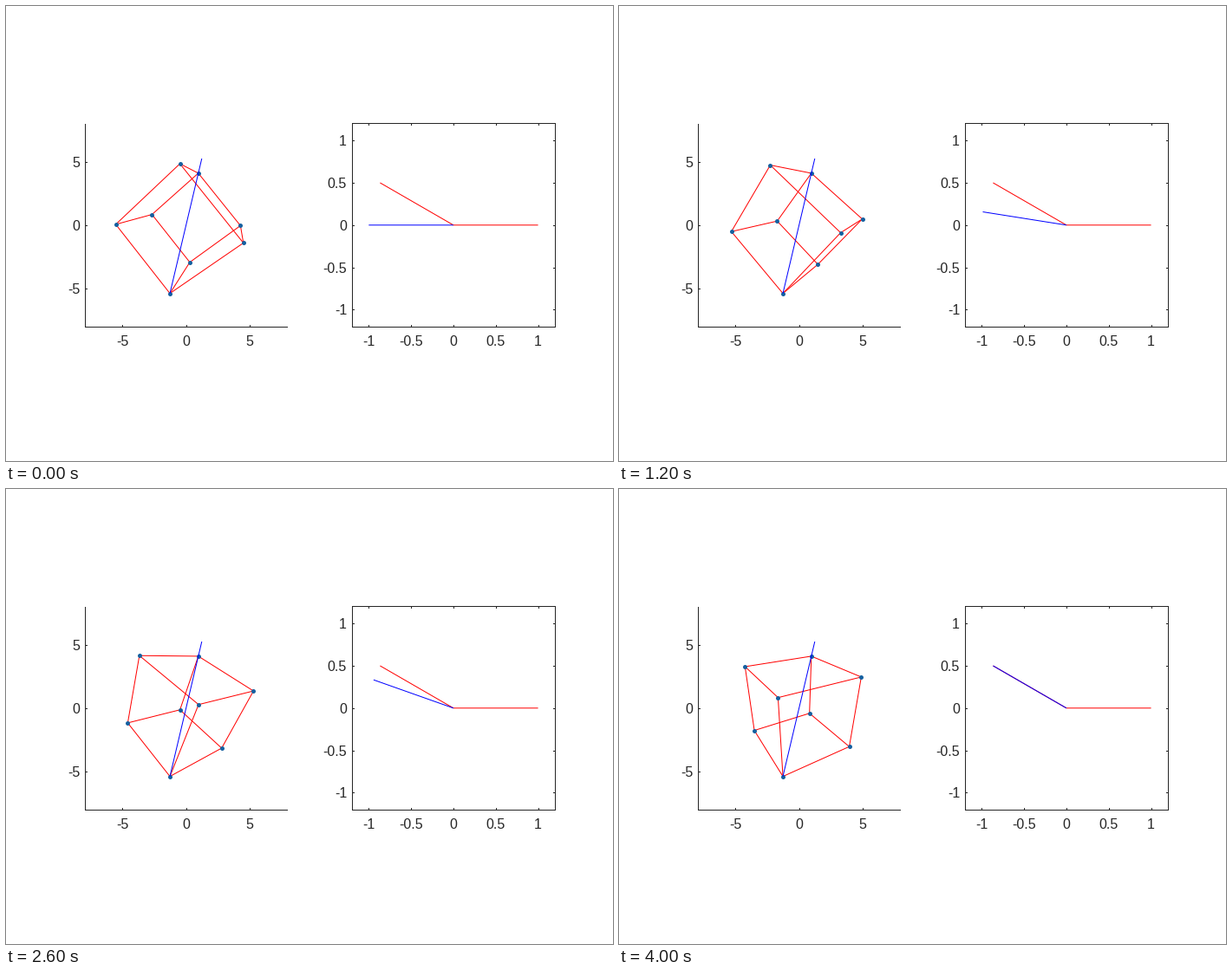
Recreate the animation shown at these times as a matplotlib script. Size 700 by 525 pixels, loop 4100 ms.

```python
from itertools import combinations, product

import matplotlib.pyplot as plt
import numpy as np
from matplotlib.animation import FuncAnimation

W, H, DPI = 700, 525, 100
FRAMES, STEP_MS = 41, 100
PX = 72 / DPI                      # one pixel in points
INK = "#262626"
SIDE = 234.3                       # side of both plots
MID_Y = 252.8
LEFT_X, RIGHT_X = 207.65, 515.95   # plot centres
LEFT_SCALE, RIGHT_SCALE = SIDE / 16, SIDE / 2.4

fig = plt.figure(figsize=(W / DPI, H / DPI), dpi=DPI, facecolor="white")
ax = fig.add_axes([0, 0, 1, 1])
ax.set_xlim(0, W)
ax.set_ylim(H, 0)
ax.axis("off")


def line(xs, ys, color, z=2):
    return ax.plot(xs, ys, color=color, lw=PX, zorder=z, snap=False,
                   solid_capstyle="butt")[0]


def hline(row, c0, c1):
    """Crisp line along one pixel row, both end columns included."""
    line([c0, c1 + 1], [row + 0.5] * 2, INK, 1)


def vline(col, r0, r1):
    line([col + 0.5] * 2, [r0, r1 + 1], INK, 1)


def label(x, y, value, align):
    ax.text(x, y, f"{value:g}", ha=align, va="baseline", color=INK,
            family="Liberation Sans", fontsize=16 * PX)


def draw_axes(cx, scale, ticks, c0, c1, r0, r1, box):
    """Axis lines, inward ticks and tick labels of one plot."""
    tick = 2
    vline(c0, r0, r1)
    hline(r1, c0, c1)
    if box:
        vline(c1, r0, r1)
        hline(r0, c0, c1)
    for t in ticks:
        x, y = cx + t * scale, MID_Y - t * scale
        col, row = round(x), round(y)
        vline(col, r1 - tick, r1)
        hline(row, c0, c0 + tick)
        if box:
            vline(col, r0, r0 + tick)
            hline(row, c1 - tick, c1)
        label(x, r1 + 22, t, "center")
        label(c0 - 6, row + 6, t, "right")


def view_matrix(azimuth, elevation):
    """Columns are the cube axes seen as right, up, towards the viewer."""
    ca, sa = np.cos(azimuth), np.sin(azimuth)
    ce, se = np.cos(elevation), np.sin(elevation)
    return np.array([[ca, -sa, 0],
                     [sa * se, ca * se, ce],
                     [-sa * ce, -ca * ce, se]])


VIEW = view_matrix(np.pi / 6, np.pi / 6)
CAMERA = 15
CORNERS = 3.0 * np.array(list(product((-1, 1), repeat=3)))
EDGES = [(i, j) for i, j in combinations(range(8), 2)
         if np.count_nonzero(CORNERS[i] != CORNERS[j]) == 1]
AXIS = np.ones(3) / np.sqrt(3)


def spin(points, angle):
    """Rotate points about the cube diagonal."""
    along = np.outer(points @ AXIS, AXIS)
    return (along + (points - along) * np.cos(angle)
            + np.cross(AXIS, points) * np.sin(angle))


def project(points):
    x, y, z = VIEW @ points.T
    k = LEFT_SCALE * CAMERA / (CAMERA - z)
    return LEFT_X + k * x, MID_Y - k * y


def ray(angle):
    r = RIGHT_SCALE
    return ([RIGHT_X, RIGHT_X + r * np.cos(angle)],
            [MID_Y, MID_Y - r * np.sin(angle)])


draw_axes(LEFT_X, LEFT_SCALE, (-5, 0, 5), 91, 324, 136, 370, False)
draw_axes(RIGHT_X, RIGHT_SCALE, (-1, -0.5, 0, 0.5, 1), 399, 633, 135, 370, True)

edge_lines = [line([], [], "red") for _ in EDGES]
dots, = ax.plot([], [], "o", ms=5 * PX, mew=0, color="#1560a0", zorder=3)
line(*project(np.array([[-3.0] * 3, [4.0] * 3])), "blue", 4)

line(*ray(0), "red")
line(*ray(np.radians(150)), "red")
hand = line([], [], "blue", 4)


def update(i):
    swing = np.radians(30) * i / (FRAMES - 1)
    x, y = project(spin(CORNERS, np.radians(60) - 2 * swing))
    for artist, (a, b) in zip(edge_lines, EDGES):
        artist.set_data([x[a], x[b]], [y[a], y[b]])
    dots.set_data(x, y)
    hand.set_data(*ray(np.pi - swing))
    return [*edge_lines, dots, hand]


anim = FuncAnimation(fig, update, frames=FRAMES, interval=STEP_MS, repeat=True,
                     repeat_delay=0, blit=False)
plt.show()
```
